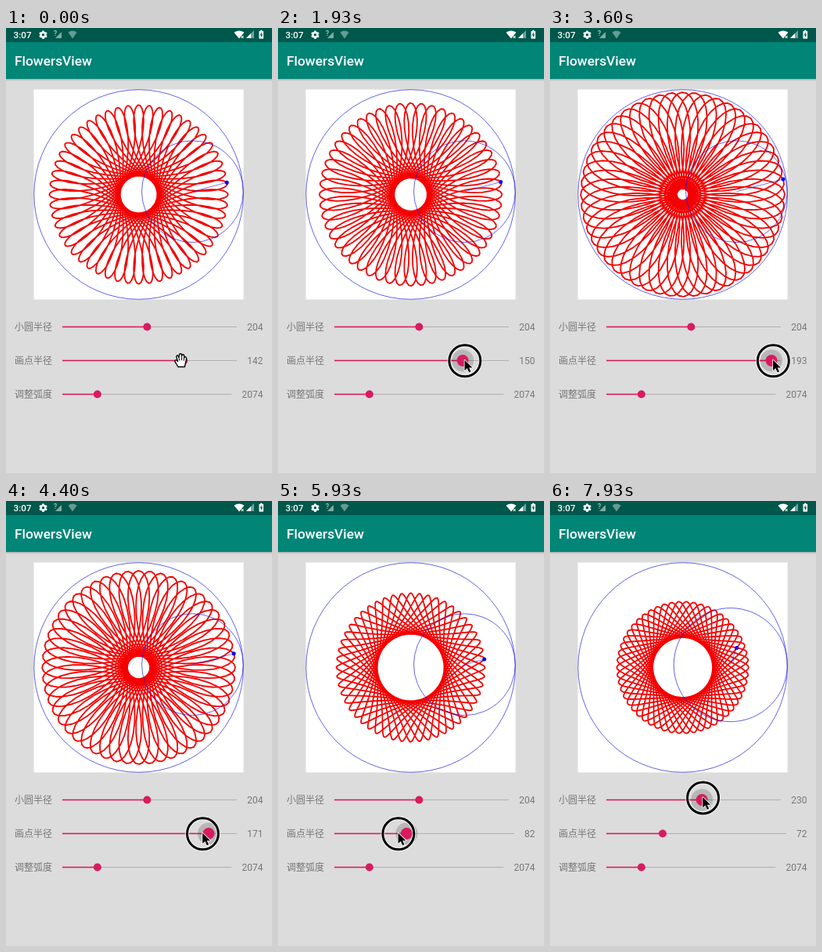
Animation, 340 px wide and 568 px high, one loop 8000 ms. Source, as an HTML page with a canvas:

```html
<!DOCTYPE html>
<html lang="zh-CN">
<head>
<meta charset="utf-8">
<title>FlowersView</title>
<style>
  html, body { margin: 0; width: 100%; height: 100%; overflow: hidden; background: #dcdcdc; }
  canvas { display: block; width: 340px; height: 568px; }
</style>
</head>
<body>
<canvas id="stage"></canvas>
<script>
const W = 340, H = 568, LOOP = 8000, STEP = 200 / 3;
const BIG = 420, RADIUS = 134, SCALE = RADIUS / BIG, CX = 169.6, CY = 212.5;
const ARC = 2074, ARC_MAX = 10000;
const PINK = '#d81b60', BLUE = '#0000ff', THIN_BLUE = '#2020dc', RED = '#f40000';
const SANS = 'Roboto, "Noto Sans CJK SC", "Noto Sans CJK", sans-serif';

const canvas = document.getElementById('stage');
const ratio = window.devicePixelRatio || 1;
canvas.width = W * ratio;
canvas.height = H * ratio;
const c = canvas.getContext('2d');
c.scale(ratio, ratio);

// Motion tracks: [time, value...]
const penTrack = [[0, 142], [350, 142], [450, 138], [1300, 140], [1930, 150], [2870, 175],
  [3850, 199], [4400, 171], [5270, 120], [6100, 72]];
const radiusTrack = [[7200, 204], [7930, 230], [8000, 232]];
const freeTrack = [[6350, 151, 424.5], [6800, 175.5, 397], [7080, 181, 380],
  [7200, 181, 379.5], [7930, 195.5, 379], [8000, 197, 379]];
const PEN_DOWN = 350, PEN_UP = 6300, RADIUS_DOWN = 7130;

function sample(track, t, k = 1) {
  if (t <= track[0][0]) return track[0][k];
  for (let i = 1; i < track.length; i++) {
    const a = track[i - 1], b = track[i];
    if (t <= b[0]) return a[k] + (b[k] - a[k]) * (t - a[0]) / (b[0] - a[0]);
  }
  return track[track.length - 1][k];
}

function rect(x, y, w, h, fill) {
  c.fillStyle = fill;
  c.fillRect(x, y, w, h);
}

function disc(x, y, r, fill) {
  c.beginPath();
  c.arc(x, y, r, 0, 2 * Math.PI);
  c.fillStyle = fill;
  c.fill();
}

function ring(x, y, r, width, color) {
  c.beginPath();
  c.arc(x, y, r, 0, 2 * Math.PI);
  c.lineWidth = width;
  c.strokeStyle = color;
  c.stroke();
}

function poly(points, fill) {
  c.beginPath();
  points.forEach(([x, y]) => c.lineTo(x, y));
  c.closePath();
  c.fillStyle = fill;
  c.fill();
}

function text(str, x, y, size, color, weight = 400, align = 'left') {
  c.font = `${weight} ${size}px ${SANS}`;
  c.textAlign = align;
  c.fillStyle = color;
  c.fillText(str, x, y);
}

function wifi(x, y, half, color) {
  c.beginPath();
  c.moveTo(x, y + 5);
  c.lineTo(x - half, y - 2.8);
  c.quadraticCurveTo(x, y - 7, x + half, y - 2.8);
  c.closePath();
  c.fillStyle = color;
  c.fill();
}

function gear(x, y) {
  for (let i = 0; i < 6; i++) {
    c.save();
    c.translate(x, y);
    c.rotate(i * Math.PI / 3);
    rect(-1.4, -5.2, 2.8, 3, '#fff');
    c.restore();
  }
  ring(x, y, 2.9, 2.2, '#fff');
}

function bars() {
  rect(0, 0, W, H, '#dcdcdc');
  const shade = c.createLinearGradient(0, 65, 0, 68);
  shade.addColorStop(0, 'rgba(0,0,0,.2)');
  shade.addColorStop(1, 'rgba(0,0,0,0)');
  rect(0, 65, W, 3, shade);
  rect(0, 0, W, 18, '#00574b');
  rect(0, 18, W, 47, '#008577');
  text('3:07', 9.5, 13, 11.7, '#fff', 500);
  text('FlowersView', 11, 48, 17.35, '#fff', 500);

  const dim = 'rgba(255,255,255,.5)';
  gear(47.5, 8.7);
  text('?', 61, 10, 8.5, 'rgba(255,255,255,.7)', 500);
  poly([[63, 13], [71, 13], [71, 5]], dim);
  wifi(85, 8.5, 5.5, 'rgba(255,255,255,.4)');

  wifi(298, 8.5, 6.5, '#fff');
  text('×', 300, 14, 8, '#fff', 700);
  poly([[307, 13], [317, 13], [317, 3]], 'rgba(255,255,255,.45)');
  poly([[307, 13], [313, 13], [313, 7]], '#fff');
  rect(323.5, 4, 5.6, 9.6, '#fff');
  rect(325, 2.8, 2.6, 1.5, '#fff');
  poly([[326.8, 5.2], [324.5, 9.2], [326, 9.2], [325.8, 12.2], [328.2, 8.2], [326.8, 8.2]], '#00574b');
}

// Pen position with y pointing up; the pen turns against the rolling circle.
function penAt(angle, r, d) {
  const turn = -BIG / r * angle;
  return [
    CX + SCALE * ((BIG - r) * Math.cos(angle) + d * Math.cos(turn)),
    CY - SCALE * ((BIG - r) * Math.sin(angle) + d * Math.sin(turn))
  ];
}

function flower(r, d) {
  rect(CX - RADIUS, CY - RADIUS, 2 * RADIUS, 2 * RADIUS, '#fff');
  c.beginPath();
  for (let i = 0; i <= ARC; i++) c.lineTo(...penAt(i / 10, r, d));
  c.lineWidth = 1.75;
  c.lineJoin = 'round';
  c.strokeStyle = RED;
  c.stroke();

  const [x, y] = penAt(ARC / 10, r, 0);
  const [px, py] = penAt(ARC / 10, r, d);
  ring(CX, CY, RADIUS - 0.2, 0.7, THIN_BLUE);
  ring(x, y, r * SCALE - 0.2, 0.7, THIN_BLUE);
  c.beginPath();
  c.moveTo(x, y);
  c.lineTo(px, py);
  c.lineWidth = 0.6;
  c.stroke();
  disc(px, py, 2.5, BLUE);
}

function slider(label, y, value, max, pressed) {
  const shown = String(Math.round(value));
  const end = 315.5 - 6.8 * shown.length;
  const x = 72 + (end - 72) * value / max;
  text(label, 11, y + 4.3, 12, '#777');
  text(shown, 328.5, y + 4.2, 12, '#777', 400, 'right');
  rect(x, y - 0.5, end - x, 1, '#b0b0b0');
  rect(72, y - 0.8, x - 72, 1.6, PINK);
  if (pressed) disc(x, y, 14, 'rgba(0,0,0,.17)');
  disc(x, y, pressed ? 7.5 : 5, PINK);
}

function arrow(x, y) {
  const shape = new Path2D('M0 0V15L3.6 11.7L6.2 17.5L8.8 16.3L6.2 10.7H11Z');
  c.save();
  c.translate(x, y);
  c.scale(0.9, 0.9);
  c.lineWidth = 1.8;
  c.lineJoin = 'round';
  c.strokeStyle = '#fff';
  c.stroke(shape);
  c.fillStyle = '#000';
  c.fill(shape);
  c.restore();
}

function hand(x, y) {
  const shape = new Path2D('M-3.5 8.5L-6.5 3.5Q-8.5 .8 -7 0Q-5.6 -.6 -4 1.6L-5.6 -4' +
    'Q-5.8 -6 -4.4 -6Q-3.2 -6 -2.6 -3.6L-2 -6.6Q-1.8 -8.2 -.4 -8.2Q.9 -8.2 1 -6.6' +
    'L1.3 -5.8Q1.8 -7.4 3 -7.2Q4.3 -7 4.2 -5.2L4.2 -3.4Q5 -4.8 6.2 -4.2Q7.2 -3.6 7 -2L6 4L4.8 8.5Z');
  c.save();
  c.translate(x, y);
  c.lineJoin = 'round';
  c.fillStyle = '#fff';
  c.fill(shape);
  c.strokeStyle = '#000';
  c.lineWidth = 1.4;
  c.stroke(shape);
  c.lineWidth = 1;
  c.stroke(new Path2D('M-2.6 -3.6L-1.8 .5M1.2 -5.8V.2M4.2 -3.4L3.7 .8'));
  c.restore();
}

function pointer(t, pressed) {
  if (t < PEN_DOWN) return hand(223.5, 424);
  let x, y;
  if (t < 6350) {
    // The slider trails the mouse a little.
    x = 71.6 + 223 * sample(penTrack, t + 110) / 204;
    y = 424.8;
  } else {
    x = sample(freeTrack, t, 1);
    y = sample(freeTrack, t, 2);
  }
  if (pressed) {
    ring(x, y, 20, 5, 'rgba(255,255,255,.75)');
    ring(x, y, 20, 3, '#000');
  }
  arrow(x - 0.3, y - 1);
}

function draw(time) {
  const t = Math.floor((time % LOOP + 4) / STEP) * STEP;
  const d = Math.round(sample(penTrack, t));
  const r = Math.round(sample(radiusTrack, t));
  const drawnR = Math.round(sample(radiusTrack, t - 60));
  const penHeld = t >= PEN_DOWN && t < PEN_UP;
  const radiusHeld = t >= RADIUS_DOWN;

  bars();
  flower(drawnR, d);
  slider('小圆半径', 381.5, r, BIG, radiusHeld);
  slider('画点半径', 424.5, d, r, penHeld);
  slider('调整弧度', 467.5, ARC, ARC_MAX, false);
  pointer(t, penHeld || radiusHeld);
}

const start = performance.now();
function tick() {
  draw(performance.now() - start);
  requestAnimationFrame(tick);
}
tick();
</script>
</body>
</html>
```
